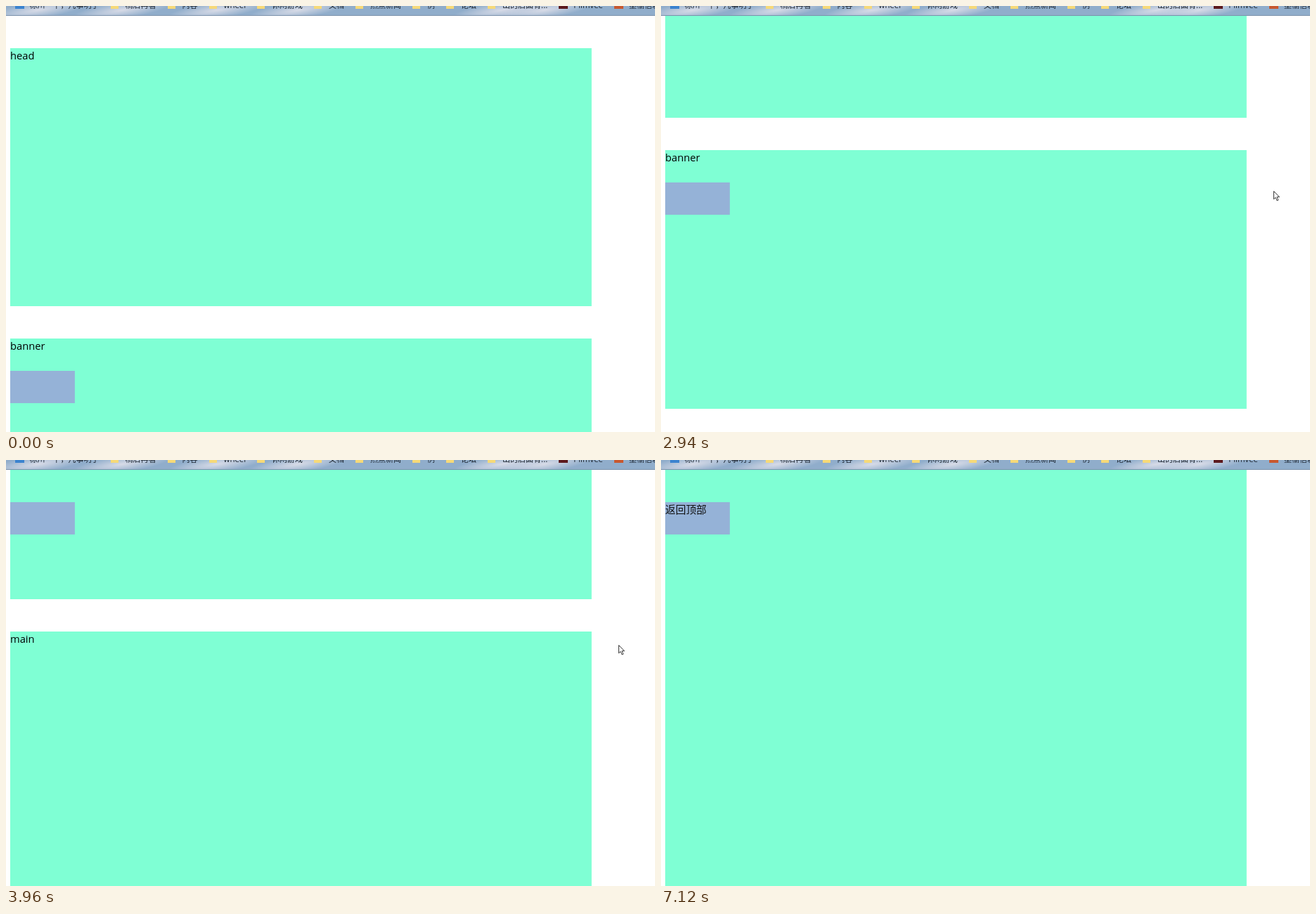
An HTML page with a canvas for the animation above (7850 ms loop, 923 by 606 pixels).

```html
<!DOCTYPE html>
<html lang="zh">
<head>
<meta charset="utf-8">
<title>Sticky box</title>
<style>
html, body { margin: 0; width: 100%; height: 100%; overflow: hidden; background: #fff; }
canvas { display: block; }
</style>
</head>
<body>
<canvas id="stage" width="923" height="606"></canvas>
<script>
const ctx = document.getElementById('stage').getContext('2d');
const W = 923, H = 606, LOOP = 7850, TICK = 70;
const ZOOM = 0.9187, LEFT = 6, TOP = 14;
const LATIN = '"Open Sans", "Noto Sans", sans-serif';
const HAN = '"Noto Sans CJK SC", "Noto Sans CJK", sans-serif';

// Page layout in page pixels
const GAP = 50, SECTION = 400, NOTCH = 100;
const labels = ['head', 'banner', 'main'];
const sectionTop = i => GAP + i * (SECTION + GAP);
const BOX_TOP = sectionTop(1) + GAP, MAIN_TOP = sectionTop(2);

// Wheel turns: start time, length in ticks, notches
const turns = [
  [2060, 4, 1], [2530, 3, 1], [2870, 4, 2], [3340, 3.2, 1],
  [3550, 3, 1], [3820, 3, 1], [4230, 4, 1], [4700, 4, 1], [5190, 2, 1]
];

const bookmarks = [
  '栎川一下，凡事明了', '稍后再看', '内容', 'wheel', '休闲游戏', '文档',
  '热点新闻', '例', '论坛', '山的后面有...', 'Plimvee', '墨榆信箱'
];
const FOLDER = '#f6d978';
const siteColor = { 0: '#3b83cf', 10: '#5c1a1e', 11: '#c8582f' };
const clouds = [45, 165, 300, 415, 705, 765];

const ticksSince = (t, start) => Math.floor((t - start) / TICK) + 1;

// Longer turns set off a little more slowly
function scrollAt(t) {
  let scroll = 0;
  for (const [start, length, notches] of turns) {
    if (t < start) break;
    const part = Math.min(1, ticksSince(t, start) / length);
    const x = Math.pow(part, 0.88 + 0.1 * notches);
    scroll += notches * NOTCH * x * x * (3 - 2 * x);
  }
  return scroll;
}

const screenY = y => Math.round(TOP + y * ZOOM);

function rect(color, x, y, w, h) {
  ctx.fillStyle = color;
  ctx.fillRect(x, y, w, h);
}

function text(str, x, y, size, family, color = '#000') {
  ctx.font = `${size}px ${family}`;
  ctx.fillStyle = color;
  ctx.fillText(str, x, y);
  return ctx.measureText(str).width;
}

function drawPage(scroll) {
  labels.forEach((label, i) => {
    const top = sectionTop(i) - scroll;
    const y = screenY(top);
    const bottom = i === 2 ? Math.max(H, y) : screenY(top + SECTION);
    rect('#7fffd4', LEFT, y, 900 * ZOOM, bottom - y);
    text(label, LEFT, y + 15.5, 14.7, LATIN);
  });
  const boxY = screenY(Math.max(GAP, BOX_TOP - scroll));
  rect('#95b2d7', LEFT, boxY, 100 * ZOOM, 50 * ZOOM);
  if (scroll >= MAIN_TOP) text('返回顶部', LEFT, boxY + 15.5, 14.7, HAN, '#111');
}

function drawBar() {
  ctx.save();
  ctx.beginPath();
  ctx.rect(0, 0, W, 13);
  ctx.clip();
  rect('#90adcb', 0, 0, W, 13);
  for (const x of clouds) {
    const glow = ctx.createRadialGradient(0, 0, 0, 0, 0, 55);
    glow.addColorStop(0, 'rgba(228,227,236,0.85)');
    glow.addColorStop(1, 'rgba(228,227,236,0)');
    ctx.save();
    ctx.translate(x, 6);
    ctx.transform(1, 0, -0.8, 0.28, 0, 0);
    rect(glow, -55, -55, 110, 110);
    ctx.restore();
  }
  ctx.restore();
  rect('#7b91ab', 0, 13, W, 1);

  let x = 12.6;
  bookmarks.forEach((name, i) => {
    const latin = /^[a-z]/i.test(name);
    rect(siteColor[i] || FOLDER, Math.round(x), 0, siteColor[i] ? 13 : 11, 4);
    x += 21;
    x += text(name, x, 3, latin ? 11.4 : 11, latin ? LATIN : HAN, '#1c2530') + 16;
  });
}

// The pointer drifts in, rests, then slides away to the right
function pointerAt(t) {
  const away = Math.max(0, ticksSince(t, 6910));
  if (t < 1260 || away > 3) return null;
  if (t < 1330) return [863, 277];
  if (t < 1530) return [861, 266];
  return [871 + Math.round(away * 5.3), 263];
}

function drawPointer(t) {
  const spot = pointerAt(t);
  if (!spot) return;
  ctx.save();
  ctx.translate(spot[0] + 0.5, spot[1] + 0.5);
  const arrow = new Path2D('M0 0V11.3L2.6 8.9L4.6 13.4L6.4 12.6L4.5 8.2H8Z');
  ctx.fillStyle = '#fff';
  ctx.fill(arrow);
  ctx.strokeStyle = '#222';
  ctx.lineWidth = 0.9;
  ctx.stroke(arrow);
  ctx.restore();
}

function draw(t) {
  rect('#fff', 0, 0, W, H);
  drawPage(scrollAt(t));
  drawBar();
  drawPointer(t);
}

const begin = performance.now();
function frame() {
  draw((performance.now() - begin) % LOOP);
  requestAnimationFrame(frame);
}
frame();
</script>
</body>
</html>
```
